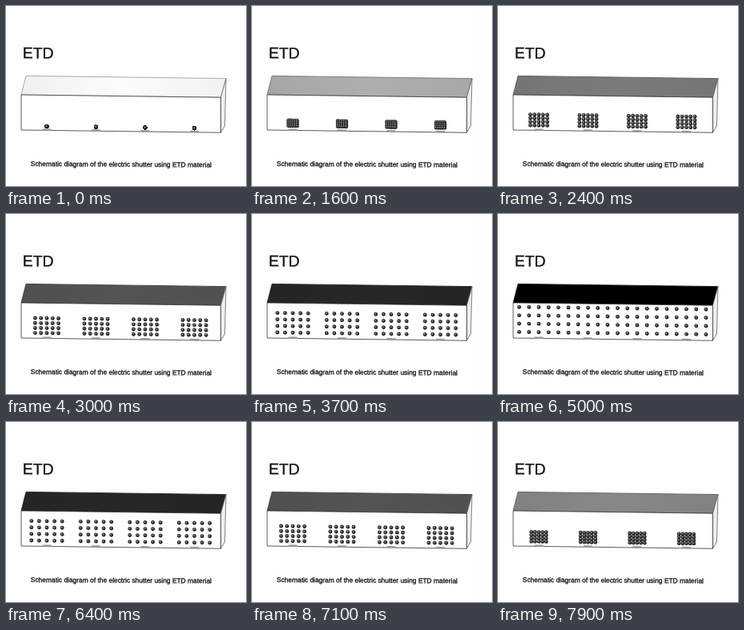
Recreate the animation shown at these times as an HTML page with a canvas. Size 300 by 225 pixels, loop 8 s.

```html
<!DOCTYPE html>
<html lang="en">
<head>
<meta charset="utf-8">
<title>Electric shutter</title>
<style>
html, body { margin: 0; width: 100%; height: 100%; overflow: hidden; background: #fefefe; }
canvas { display: block; width: 300px; height: 225px; }
</style>
</head>
<body>
<canvas id="stage"></canvas>
<script>
const canvas = document.getElementById('stage');
const ctx = canvas.getContext('2d');
const ratio = window.devicePixelRatio || 1;
canvas.width = 300 * ratio;
canvas.height = 225 * ratio;
ctx.scale(ratio, ratio);

const LOOP = 8000, STEP = 100, PEAK = 5050;
const GROUPS = 4, COLS = 5, ROWS = 4;
const LEFT = 19, RIGHT = 268.5, TOP = 111, BOTTOM = 155;
const RIDGE = 87.3, RIDGE_LEFT = 25, RIDGE_RIGHT = 275;

const ramp = (t, from, to) => Math.min(1, Math.max(0, (t - from) / (to - from)));
const gray = v => `rgb(${Math.round(v)},${Math.round(v)},${Math.round(v)})`;

// Tilts everything painted, keeping x = LEFT in place
function tilted(slope, paint) {
  ctx.save();
  ctx.transform(1, slope, 0, 1, 0, -slope * LEFT);
  paint();
  ctx.restore();
}

function shape(points, fill, stroke) {
  ctx.beginPath();
  points.forEach(([x, y]) => ctx.lineTo(x, y));
  ctx.closePath();
  ctx.fillStyle = fill;
  ctx.fill();
  ctx.strokeStyle = stroke;
  ctx.lineWidth = 0.8;
  ctx.stroke();
}

function drawBox(dark) {
  const shade = v => gray(v * (1 - dark));
  const roof = ctx.createLinearGradient(LEFT, 0, RIGHT, 0);
  roof.addColorStop(0, shade(240));
  roof.addColorStop(0.5, shade(252));
  roof.addColorStop(1, shade(242));

  const frontLeft = [LEFT, TOP], frontRight = [RIGHT, TOP];
  const ridgeRight = [RIDGE_RIGHT, RIDGE];
  shape([frontLeft, [RIDGE_LEFT, RIDGE], ridgeRight, frontRight], roof, shade(150));
  shape([frontRight, ridgeRight, [273.5, 146.5], [RIGHT, BOTTOM]], '#eee', '#666');
  shape([frontLeft, frontRight, [RIGHT, BOTTOM], [LEFT, BOTTOM]], '#fff', '#333');
}

function drawBall(x, y) {
  const r = 2.45;
  const g = ctx.createRadialGradient(x - 0.7, y - 0.8, 0.1, x, y, r);
  g.addColorStop(0, '#b0b0b0');
  g.addColorStop(0.35, '#505050');
  g.addColorStop(1, '#0a0a0a');
  ctx.beginPath();
  ctx.arc(x, y, r, 0, Math.PI * 2);
  ctx.fillStyle = g;
  ctx.fill();
}

function drawGroup(cx, spread) {
  ctx.fillStyle = '#999';
  ctx.fillRect(cx - 5.5, BOTTOM - 1.9, 11, 2.4);
  const floor = 150 - 2.7 * spread;
  for (let row = ROWS - 1; row >= 0; row--)
    for (let col = 0; col < COLS; col++)
      drawBall(cx + (col - (COLS - 1) / 2) * 12.25 * spread, floor - row * 10.4 * spread);
}

function write(text, size, x, y) {
  ctx.font = `${size}px "Liberation Sans", Arial, sans-serif`;
  ctx.fillStyle = ctx.strokeStyle = '#111';
  ctx.lineWidth = 0.3;
  ctx.fillText(text, x, y);
  ctx.strokeText(text, x, y);
}

function draw(t) {
  // The shutter closes until PEAK, then opens again the same way
  const u = PEAK - Math.abs(t - PEAK);
  const spread = ramp(u, 800, 4500);
  const dark = ramp(u, 400, 4300);

  ctx.fillStyle = '#fefefe';
  ctx.fillRect(0, 0, 300, 225);
  tilted(0.013, () => {
    drawBox(dark);
    for (let i = 0; i < GROUPS; i++) drawGroup(51 + 61.5 * i, spread);
  });
  tilted(0.006, () => {
    write('ETD', 19.5, 20.7, 65.3);
    write('Schematic diagram of the electric shutter using ETD material', 8.42, 30.8, 200);
  });
}

function tick() {
  const t = performance.now() % LOOP;
  draw(Math.floor(t / STEP) * STEP);
  requestAnimationFrame(tick);
}
tick();
</script>
</body>
</html>
```
